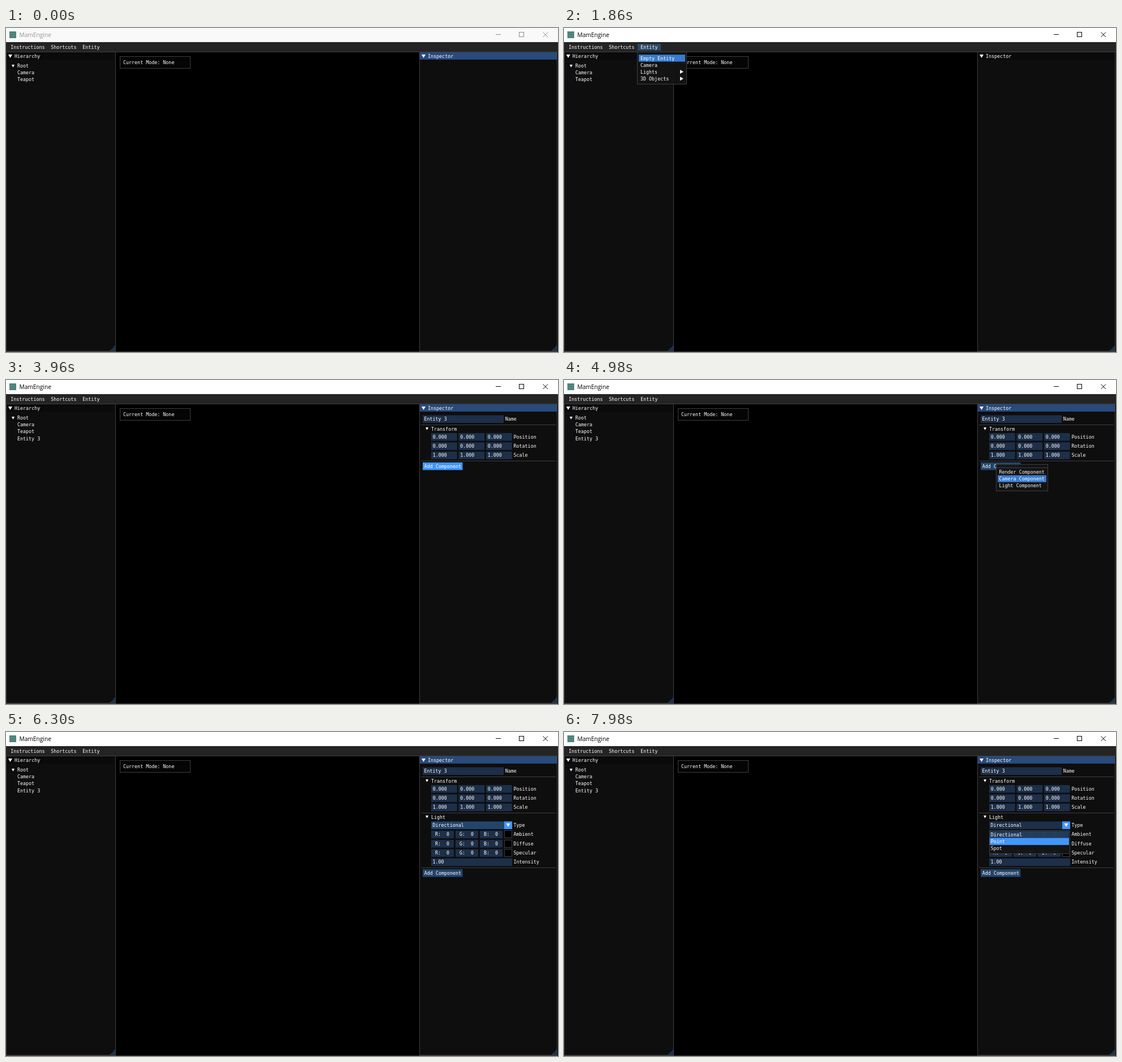
Recreate the animation shown at these times as an HTML page with a canvas. Size 975 by 574 pixels, loop 8 s.

```html
<!DOCTYPE html>
<html lang="en">
<head>
<meta charset="utf-8">
<title>Engine editor</title>
<style>
html, body { margin: 0; width: 100%; height: 100%; overflow: hidden; background: #000; }
canvas { display: block; }
</style>
</head>
<body>
<canvas id="stage" width="975" height="574"></canvas>
<script>
const ctx = document.getElementById("stage").getContext("2d");
const LOOP = 8000;
const MONO = '8.35px "DejaVu Sans Mono", monospace';
const LINE = "#3e3e45", PANEL = "#0e0e0e", POPUP = "rgba(20,20,20,.94)";
const FRAME = "#1d2f49", BUTTON = "#23456d", HOVER = "#4296fa", PRESSED = "#0f87fa";
const accent = a => `rgba(66,150,250,${a})`;
const SELECTED = accent(.31), HOT = accent(.8), HELD = accent(1);

// Rectangles are given by their edges.
function box(x0, y0, x1, y1, fill) {
  ctx.fillStyle = fill;
  ctx.fillRect(x0, y0, x1 - x0, y1 - y0);
}

function outline(x0, y0, x1, y1, color = LINE) {
  ctx.strokeStyle = color;
  ctx.lineWidth = 1;
  ctx.strokeRect(x0 + .5, y0 + .5, x1 - x0 - 1, y1 - y0 - 1);
}

function framed(x0, y0, x1, y1, fill) {
  box(x0, y0, x1, y1, fill);
  outline(x0, y0, x1, y1);
}

function text(str, x, middle) {
  ctx.font = MONO;
  ctx.fillStyle = "#fff";
  ctx.fillText(str, x, middle + 3);
}

function shape(points, fill) {
  ctx.fillStyle = fill;
  ctx.beginPath();
  points.forEach(([x, y]) => ctx.lineTo(x, y));
  ctx.fill();
}

const arrowDown = (x, y, w, h) => shape([[x, y], [x + w, y], [x + w / 2, y + h]], "#fff");
const arrowRight = (x, y) => shape([[x, y], [x + 6, y + 3.5], [x, y + 7]], "#fff");

function field(x0, x1, middle, str, textX, fill = FRAME) {
  box(x0, middle - 6.5, x1, middle + 7, fill);
  text(str, textX, middle);
}

function titleBar(active) {
  const ink = active ? "#000" : "#8c8c8c";
  box(0, 0, 975, 25, active ? "#fff" : "#f9f9f9");
  box(6, 6, 18, 18, "#4f8580");
  ctx.font = '10.2px "Open Sans", sans-serif';
  ctx.fillStyle = active ? "#000" : "#969696";
  ctx.fillText("MamEngine", 23.5, 16);
  box(865, 11, 874, 12, ink);
  outline(906, 7, 915, 16, ink);
  ctx.strokeStyle = ink;
  ctx.beginPath();
  ctx.moveTo(948.5, 7.5);
  ctx.lineTo(957, 16);
  ctx.moveTo(957, 7.5);
  ctx.lineTo(948.5, 16);
  ctx.stroke();
}

function menuBar(entityFill) {
  box(0, 25, 975, 42, "#242424");
  if (entityFill) box(130, 28, 171, 40, entityFill);
  text("Instructions", 8.2, 34);
  text("Shortcuts", 79.2, 34);
  text("Entity", 135.3, 34);
}

function panel(x0, x1, title, focused) {
  box(x0, 43, x1, 573, PANEL);
  box(x0, 43, x1, 56, focused ? "#294a7a" : "#0a0a0a");
  shape([[x1 - 1, 562], [x1 - 1, 572], [x1 - 11, 572]], "#1b3049");
  outline(x0, 42, x1, 573);
  arrowDown(x0 + 4, 47, 7, 6);
  text(title, x0 + 15, 50);
}

function hierarchy(names) {
  panel(0, 194, "Hierarchy", false);
  arrowDown(10, 65, 5.2, 4.8);
  names.forEach((name, i) => text(name, 20, 67 + i * 12.2));
}

function separator(y) {
  box(733, y, 971, y + 1, LINE);
}

function section(name, middle) {
  arrowDown(741, middle - 2.5, 5.2, 4.8);
  text(name, 751, middle);
}

function transform() {
  field(736, 879, 69, "Entity 3", 738.5);
  text("Name", 881.7, 69);
  separator(79);
  section("Transform", 86.5);
  ["Position", "Rotation", "Scale"].forEach((label, row) => {
    const y = 100.5 + row * 16.4;
    const value = row === 2 ? "1.000" : "0.000";
    for (let i = 0; i < 3; i++) {
      const x = 751 + i * 48.5;
      field(x, x + 45.7, y, value, x + 2.7);
    }
    text(label, 896.5, y);
  });
  separator(143);
}

function light({ comboHover, redHover, comboOpen }) {
  section("Light", 150.5);
  field(751, 894, 165, "Directional", 753.5, comboHover ? BUTTON : FRAME);
  box(880, 158.5, 894, 172, comboHover || comboOpen ? HOVER : BUTTON);
  arrowDown(883.5, 162, 7, 6);
  text("Type", 896.5, 165);
  ["Ambient", "Diffuse", "Specular"].forEach((label, row) => {
    const y = 181.3 + row * 16.4;
    [..."RGB"].forEach((channel, i) => {
      const x = 751 + i * 43;
      const fill = redHover && row + i === 0 ? BUTTON : FRAME;
      field(x, x + 40, y, channel + ":  0", x + 7, fill);
    });
    const top = Math.round(y - 7);
    framed(880, top, 894, top + 14, "#000");
    text(label, 896.5, y);
  });
  field(751, 894, 230.4, "1.00", 753.5);
  text("Intensity", 896.5, 230.4);
  separator(240);
}

function rows(items, x0, x1, textX, top, fills) {
  items.forEach((item, i) => {
    const y = top + i * 12.2;
    if (fills[i]) box(x0, y, x1, y + 12.4, fills[i]);
    text(item, textX, y + 6.3);
  });
}

function entityMenu(fills) {
  framed(129, 42, 217, 100, POPUP);
  rows(["Empty Entity", "Camera", "Lights", "3D Objects"], 132, 214, 135, 47.2, fills);
  arrowRight(205, 74);
  arrowRight(205, 86.2);
}

function componentMenu(fills) {
  framed(763, 149, 855, 197, POPUP);
  box(764, 155, 854, 156, LINE);
  rows(["Render Component", "Camera Component", "Light Component"], 766, 852, 768.5, 156.5, fills);
}

function typeList(fills) {
  framed(751, 174, 894, 216, POPUP);
  rows(["Directional", "Point", "Spot"], 752, 892, 753.7, 175.6, fills);
}

function draw(t) {
  const within = (from, to) => t >= from && t < to;
  const created = t >= 2220, lit = t >= 5580;
  const menuOpen = within(1380, 2220);

  box(0, 0, 975, 574, "#000");
  titleBar(t >= 1380);
  menuBar(within(1020, 1800) ? HOT : within(1800, 2220) ? SELECTED : null);
  box(0, 42, 975, 43, LINE);
  box(0, 573, 975, 574, "#3a3a3a");
  framed(201, 50, 326, 72, "#050505");
  text("Current Mode: None", 207, 61);
  hierarchy(["Root", "Camera", "Teapot"].concat(created ? "Entity 3" : []));
  panel(730, 974, "Inspector", !menuOpen);

  if (created) {
    transform();
    if (lit) {
      light({
        redHover: t < 6300,
        comboHover: within(6300, 6900),
        comboOpen: t >= 6900
      });
    }
    const hovered = within(3120, 3240) || within(3960, 4320);
    const fill = hovered ? HOVER : within(4320, 4380) ? PRESSED : BUTTON;
    field(736, 806.5, lit ? 249.7 : 152.5, "Add Component", 738.8, fill);
  }

  if (menuOpen) entityMenu([t >= 1860 && HOT]);
  if (within(4380, 5580)) {
    componentMenu([
      within(4740, 4980) && HOT,
      within(4980, 5160) && HOT,
      t >= 5460 ? HELD : t >= 5160 && HOT
    ]);
  }
  if (t >= 6900) {
    typeList([
      within(7320, 7620) ? HOT : SELECTED,
      t >= 7980 ? HELD : t >= 7620 && HOT
    ]);
  }
}

function tick() {
  draw(performance.now() % LOOP);
  requestAnimationFrame(tick);
}
tick();
</script>
</body>
</html>
```
